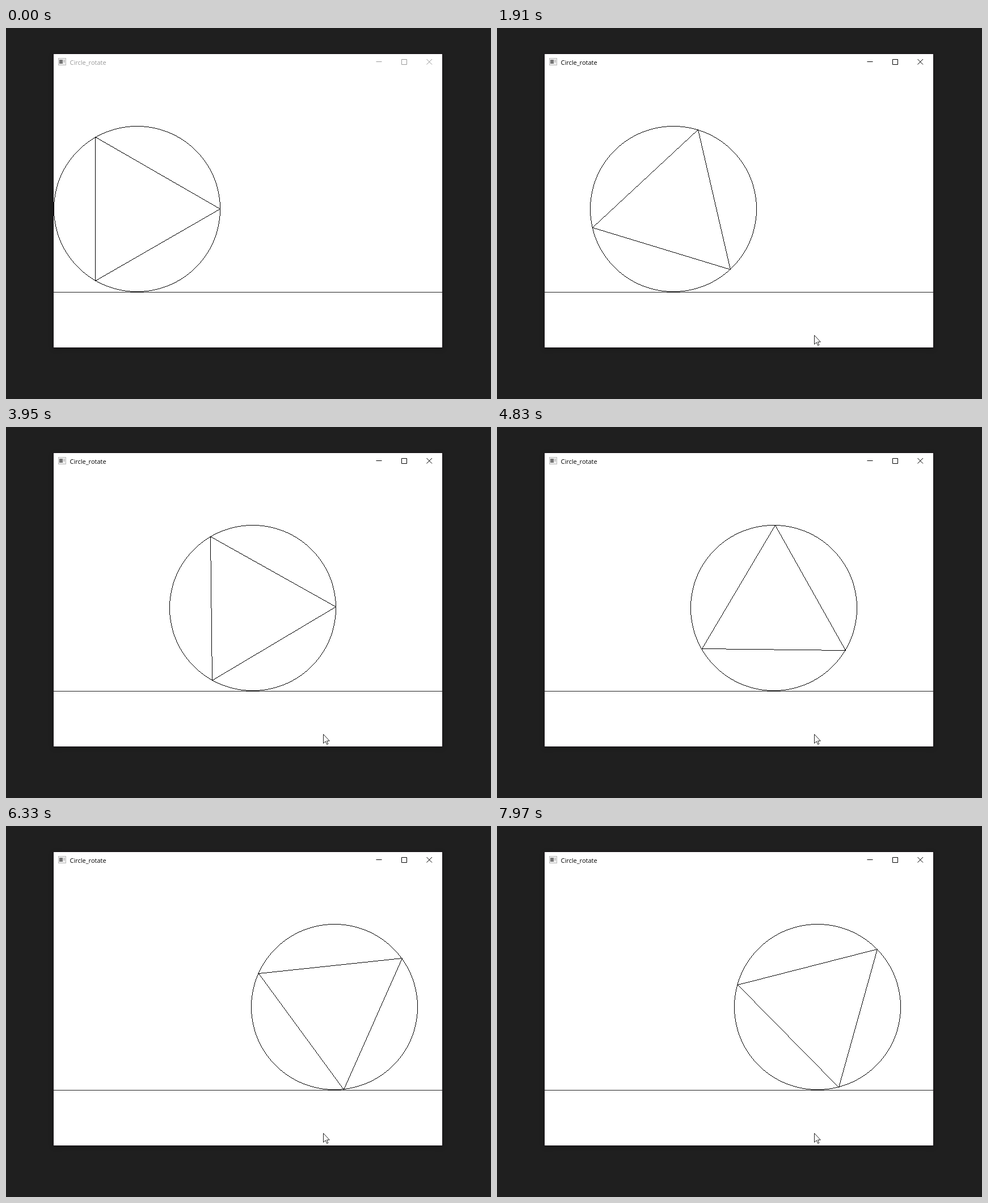
An HTML page with a canvas for the animation above (7.99 s loop, 855 px wide and 655 px high).

```html
<!DOCTYPE html>
<html lang="en">
<head>
<meta charset="utf-8">
<title>Circle_rotate</title>
<style>
  html, body { margin: 0; width: 100%; height: 100%; overflow: hidden; background: #1f1f1f; }
  .window {
    position: absolute; left: 84px; top: 46px; width: 685px; height: 518px;
    background: #fff; box-shadow: 0 0 0 1px #181418, 0 2px 9px #0004;
  }
  canvas, svg { position: absolute; left: 0; top: 0; }
  text { font: 11px "Open Sans", "Noto Sans", sans-serif; }
  #titlebar { color: #999; }
  #titlebar.active { color: #000; }
</style>
</head>
<body>
<div class="window"></div>
<canvas id="scene" width="855" height="655"></canvas>
<svg width="855" height="655" viewBox="0 0 855 655">
  <g>
    <rect x="92.5" y="53.5" width="13" height="12" fill="#eee" stroke="#bbb"/>
    <rect x="94" y="56" width="6" height="7" fill="#777"/>
    <rect x="101" y="56" width="3" height="5" fill="#ccc"/>
  </g>
  <g id="titlebar">
    <text x="112.5" y="64.5" fill="currentColor">Circle_rotate</text>
    <g fill="none" stroke="currentColor">
      <path d="M652.5 59.5h10M697.5 55.5h9v9h-9z"/>
      <path d="M741.5 55l9.5 9.5M751 55l-9.5 9.5"/>
    </g>
  </g>
  <path id="cursor" d="M.5.5v16l3.7-3.5 2.5 5.5 2.2-1-2.4-5.3h4.8z" fill="#fff" stroke="#222"/>
</svg>
<script>
const LOOP = 7990, STEP = 20, FIRST_CHANGE = 70;
const START = 584, TURN = 7034, SPEED = 0.0607;
const RADIUS_X = 146.5, RADIUS_Y = 146, START_X = 230.5, CENTER_Y = 319;
const TURN_PER_PIXEL = 0.0102;   // radians

// Pointer stops: time, x, y
const pointerPath = [[90, 520, 630], [500, 470, 370], [640, 470, 370], [1100, 559, 542]];

const [titlebar, cursor, scene] =
  ['titlebar', 'cursor', 'scene'].map(id => document.getElementById(id));
const ctx = scene.getContext('2d');

// Hard-edged drawing, one pixel at a time
const plot = (x, y) => ctx.fillRect(Math.round(x), Math.round(y), 1, 1);

function plotLine([x0, y0], [x1, y1]) {
  const steps = Math.max(Math.abs(x1 - x0), Math.abs(y1 - y0));
  for (let i = 0; i <= steps; i++) {
    plot(x0 + (x1 - x0) * i / steps, y0 + (y1 - y0) * i / steps);
  }
}

function plotCircle(cx, cy, rx, ry) {
  for (let d = -Math.ceil(rx * Math.SQRT1_2) - 0.5; d <= rx * Math.SQRT1_2 + 1; d++) {
    const dy = ry * Math.sqrt(1 - (d / rx) ** 2);
    plot(cx + d, cy - dy);
    plot(cx + d, cy + dy);
    const row = Math.round(d);
    const dx = rx * Math.sqrt(1 - (row / ry) ** 2);
    plot(cx - dx, cy + row);
    plot(cx + dx, cy + row);
  }
}

function pointerAt(t) {
  const next = pointerPath.findIndex(stop => stop[0] > t);
  if (next < 0) return pointerPath.at(-1).slice(1);
  const [t0, x0, y0] = pointerPath[Math.max(0, next - 1)];
  const [t1, x1, y1] = pointerPath[next];
  const p = t1 > t0 ? (t - t0) / (t1 - t0) : 0;
  const ease = p * p * (3 - 2 * p);
  return [Math.round(x0 + (x1 - x0) * ease), Math.round(y0 + (y1 - y0) * ease)];
}

function draw(t) {
  const forward = Math.min(t, TURN) - START;
  const back = Math.max(0, t - TURN);
  const distance = Math.max(0, forward - back) * SPEED;
  const vertices = [0, 1, 2].map(i => {
    const angle = distance * TURN_PER_PIXEL + i * 2 * Math.PI / 3;
    return [
      Math.round(START_X + distance + RADIUS_X * Math.cos(angle)),
      Math.round(CENTER_Y + RADIUS_X * Math.sin(angle))
    ];
  });

  ctx.clearRect(0, 0, scene.width, scene.height);
  ctx.fillStyle = '#222';
  ctx.fillRect(84, 466, 685, 1);
  ctx.fillStyle = '#000';
  plotCircle(START_X + Math.floor(distance), CENTER_Y, RADIUS_X, RADIUS_Y);
  vertices.forEach((v, i) => plotLine(v, vertices[(i + 1) % 3]));

  titlebar.classList.toggle('active', t >= START - STEP);
  cursor.style.display = t < pointerPath[0][0] ? 'none' : '';
  cursor.setAttribute('transform', `translate(${pointerAt(t)})`);
}

function tick() {
  const t = performance.now() % LOOP;
  draw(t < FIRST_CHANGE ? 0 : FIRST_CHANGE + Math.floor((t - FIRST_CHANGE) / STEP) * STEP);
  requestAnimationFrame(tick);
}
tick();
</script>
</body>
</html>
```
